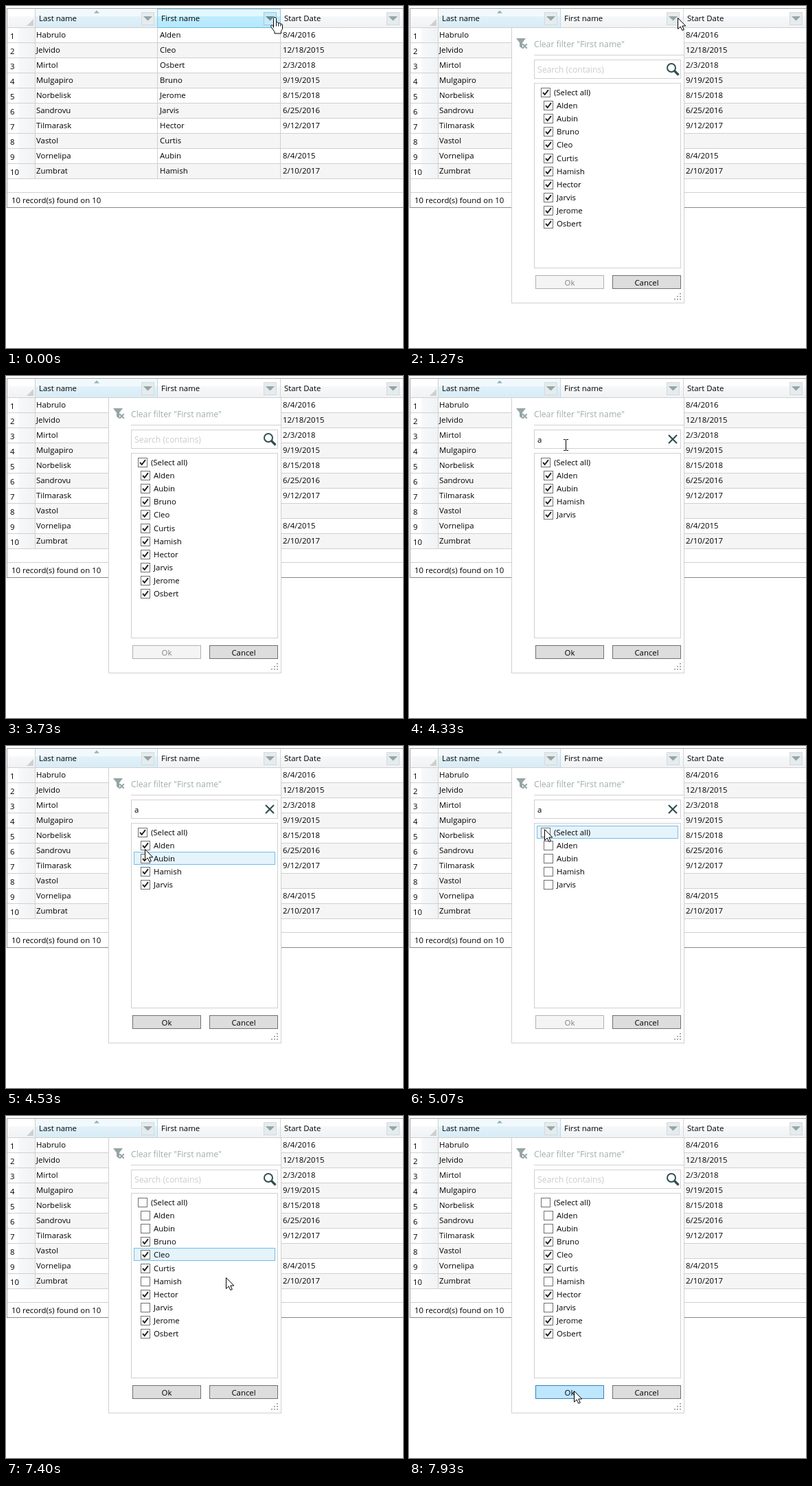
An HTML page with a canvas for the animation above (8000 ms loop, 578 by 498 pixels).

```html
<!DOCTYPE html>
<html lang="en">
<head>
<meta charset="utf-8">
<title>Column filter</title>
<style>
html, body { margin: 0; width: 100%; height: 100%; overflow: hidden; background: #fff; }
canvas { display: block; width: 578px; height: 498px; }
</style>
</head>
<body>
<canvas id="stage" width="578" height="498"></canvas>
<script>
const ctx = document.getElementById('stage').getContext('2d');
const LOOP = 8000, FPS = 15;
const SLATE = '#2f4f4f', MUTED = '#95a5a6', LINE = '#d0d0d0';

const people = [
  ['Habrulo', 'Alden', '8/4/2016'],
  ['Jelvido', 'Cleo', '12/18/2015'],
  ['Mirtol', 'Osbert', '2/3/2018'],
  ['Mulgapiro', 'Bruno', '9/19/2015'],
  ['Norbelisk', 'Jerome', '8/15/2018'],
  ['Sandrovu', 'Jarvis', '6/25/2016'],
  ['Tilmarask', 'Hector', '9/12/2017'],
  ['Vastol', 'Curtis', ''],
  ['Vornelipa', 'Aubin', '8/4/2015'],
  ['Zumbrat', 'Hamish', '2/10/2017']
];
const firstNames = people.map(p => p[1]).sort();
const hasA = name => /a/i.test(name);

// Ticks at which the interface changes
const OPEN = 8, TYPE = 57, FILTER = 58, UNCHECK = 76, HOT = 102, CLEAR = 106;

// Pointer path: tick, x, y
const path = [
  [19, 391, 17], [21, 368, 46], [23, 320, 92], [25, 268, 118], [28, 230, 94],
  [65, 228, 100], [66, 217, 138], [67, 206, 164], [68, 202, 150],
  [70, 199, 132], [74, 197, 121], [91, 197, 121], [93, 226, 117],
  [96, 325, 100], [99, 386, 90], [106, 386, 90], [109, 352, 160],
  [113, 287, 310], [116, 252, 391], [118, 244, 407], [119, 240, 400]
];

function pointer(k) {
  if (k <= path[0][0]) return path[0].slice(1);
  const i = path.findIndex(p => p[0] >= k);
  const a = path[i - 1], b = path[i];
  const u = (k - a[0]) / (b[0] - a[0]);
  return [a[1] + (b[1] - a[1]) * u, a[2] + (b[2] - a[2]) * u].map(Math.round);
}

const inside = ([px, py], x, y, w, h) => px >= x && px < x + w && py >= y && py < y + h;

function fill(x, y, w, h, color) {
  ctx.fillStyle = color;
  ctx.fillRect(x, y, w, h);
}

function box(x, y, w, h, bg, border) {
  fill(x, y, w, h, border);
  fill(x + 1, y + 1, w - 2, h - 2, bg);
}

function text(s, x, y, color = '#000', size = 11.4, align = 'left') {
  ctx.font = size + 'px "Open Sans", "Noto Sans", sans-serif';
  ctx.textAlign = align;
  ctx.fillStyle = color;
  ctx.fillText(s, x, y);
}

function shape(points, color) {
  ctx.beginPath();
  points.forEach(([x, y]) => ctx.lineTo(x, y));
  ctx.closePath();
  ctx.fillStyle = color;
  ctx.fill();
}

function stroke(points, color, width) {
  ctx.beginPath();
  points.forEach(([x, y], i) => i ? ctx.lineTo(x, y) : ctx.moveTo(x, y));
  ctx.strokeStyle = color;
  ctx.lineWidth = width;
  ctx.stroke();
}

function cross(x, y, r, color, width) {
  stroke([[x - r, y - r], [x + r, y + r]], color, width);
  stroke([[x - r, y + r], [x + r, y - r]], color, width);
}

// Two-tone glass gradient with a hard edge at 40 %
function glass(x, y, w, h, [top, low, end], vertical = true) {
  const g = vertical ? ctx.createLinearGradient(0, y, 0, y + h)
                     : ctx.createLinearGradient(x, 0, x + w, 0);
  g.addColorStop(0, top);
  g.addColorStop(0.4, top);
  g.addColorStop(0.4, low);
  g.addColorStop(1, end);
  fill(x, y, w, h, g);
}

const PLAIN = ['#ffffff', '#f7f8fa', '#f1f2f4'];
const SORTED = ['#f2f9fc', '#e1f1f9', '#d8ecf6'];
const HOVER = ['#e3f7ff', '#bdedff', '#b7e7fb'];

function header(label, x, w, tones, edge) {
  glass(x, 4, w, 27, tones);
  fill(x + w - 1, 4, 1, 27, edge);
  text(label, x + 5, 22);
}

function dropButton(x, hot) {
  box(x, 9, 19, 19, hot ? '#c5ebfa' : 'rgba(255,255,255,0)', hot ? '#a3c6d4' : '#d3dadd');
  if (!hot) {
    ctx.globalAlpha *= 0.6;
    fill(x + 1, 10, 17, 17, '#f4f7f8');
    ctx.globalAlpha /= 0.6;
  }
  shape([[x + 3, 15], [x + 16, 15], [x + 9.5, 21.5]], hot ? '#688792' : MUTED);
}

function table(hover) {
  fill(1, 3, 577, 1, '#a0a0a0');
  fill(1, 3, 1, 291, '#a0a0a0');
  fill(1, 293, 577, 1, '#888');

  glass(2, 4, 41, 27, PLAIN);
  fill(42, 4, 1, 27, LINE);
  shape([[40, 19], [40, 29], [30, 29]], '#cdcfd1');
  header('Last name', 43, 178, SORTED, '#b8dced');
  shape([[128, 10.5], [132, 6.5], [136, 10.5]], '#8eb1c0');
  header('First name', 221, 179, hover ? HOVER : PLAIN, hover ? '#8ec4dd' : '#d5d5d5');
  header('Start Date', 400, 178, PLAIN, '#f1f2f4');
  fill(2, 31, 576, 1, LINE);
  if (hover) {
    fill(220, 4, 1, 27, '#8ec4dd');
    fill(221, 4, 178, 1, '#86c6e4');
    fill(221, 31, 178, 1, '#69bbe3');
  }
  dropButton(197, false);
  dropButton(375, hover);
  dropButton(554, false);

  people.forEach((row, i) => {
    const y = 32 + 22 * i;
    fill(43, y, 535, 21, i % 2 ? '#f5f5f5' : '#fff');
    glass(2, y, 41, 21, PLAIN, false);
    fill(2, y + 21, 576, 1, LINE);
    text(String(i + 1), 6, y + 16);
    row.forEach((s, c) => text(s, [44, 224, 403][c], y + 14));
  });
  [42, 220, 399].forEach(x => fill(x, 32, 1, 220, LINE));
  fill(2, 271, 576, 1, LINE);
  text('10 record(s) found on 10', 8, 287);
}

function checkbox(x, y, on) {
  box(x, y, 14, 14, '#fff', '#707070');
  if (on) stroke([[x + 3, y + 6.8], [x + 5.7, y + 10], [x + 11, y + 3.2]], '#212121', 2);
}

function button(label, x, state) {
  const [bg, edge, ink] = {
    normal: ['#dddddd', '#707070', '#000'],
    hover: ['#bee6fd', '#3c7fb1', '#000'],
    off: ['#f4f4f4', '#adb2b5', '#838383']
  }[state];
  box(x, 392, 100, 20, bg, edge);
  text(label, x + 50, 407, ink, 11.4, 'center');
}

function funnel() {
  shape([[156, 47], [170, 47], [165, 53.5], [165, 62], [161, 59], [161, 53.5]], MUTED);
  fill(165, 55, 8, 8, '#fff');
  cross(168.5, 58.5, 3.2, MUTED, 2);
}

function searchIcon() {
  ctx.beginPath();
  ctx.arc(382, 90, 6, 0, Math.PI * 2);
  ctx.strokeStyle = SLATE;
  ctx.lineWidth = 2;
  ctx.stroke();
  stroke([[386.5, 94.5], [392.5, 100.5]], SLATE, 3.2);
}

function list(k) {
  const filtered = k >= FILTER && k < CLEAR;
  const cleared = k >= UNCHECK;
  const names = filtered ? firstNames.filter(hasA) : firstNames;
  const lastPos = pointer(k - 1);
  box(182, 112, 214, 270, '#fff', LINE);
  ['(Select all)', ...names].forEach((name, i) => {
    const y = Math.round(116 + 19.1 * i);
    const x = i ? 196 : 192;
    if (k > 19 && inside(lastPos, 186, y, 206, 19)) box(186, y, 206, 19, '#e5f3fb', '#70c0e7');
    checkbox(x, y + 3, !cleared || (i > 0 && !hasA(name)));
    text(name, x + 19, y + 14);
  });
}

function popup(k, pos) {
  box(149, 31, 252, 402, '#fff', LINE);
  funnel();
  text('Clear filter "First name"', 182, 60, '#a0adae', 12.2);
  fill(182, 71, 218, 1, LINE);

  const typed = k >= TYPE && k < CLEAR;
  box(182, 78, 214, 28, '#fff', LINE);
  if (typed) {
    text('a', 187, 97);
    cross(384, 92, 6, k >= HOT ? '#e0201b' : SLATE, 2.2);
  } else {
    text('Search (contains)', 187, 97, '#c9cccd', 12.2);
    searchIcon();
  }
  const caret = (k >= 28 && k < 34) || (k >= 43 && k < 50);
  if (caret) fill(187, 83, 1, 18, '#000');
  if (k >= TYPE && k < 65) fill(194, 83, 1, 18, '#000');

  list(k);

  const enabled = (k >= FILTER && k < UNCHECK) || k >= CLEAR;
  const over = inside(pos, 184, 392, 100, 20);
  button('Ok', 184, !enabled ? 'off' : over ? 'hover' : 'normal');
  button('Cancel', 296, 'normal');

  for (let r = 0; r < 3; r++)
    for (let c = 2 - r; c < 3; c++) fill(386 + c * 4, 418 + r * 4, 2, 2, '#a9b0b3');
}

function outlined(d, x, y) {
  const p = new Path2D(d);
  ctx.save();
  ctx.translate(x + 0.5, y + 0.5);
  ctx.lineJoin = 'round';
  ctx.fillStyle = '#fff';
  ctx.fill(p);
  ctx.strokeStyle = '#000';
  ctx.lineWidth = 1;
  ctx.stroke(p);
  ctx.restore();
}

const ARROW = 'M0 0V16L3.7 12.5L6.3 18L8.8 17L6.3 11.5H11.3Z';
const HAND = 'M-2 14V1Q-2 -1 0 -1Q2 -1 2 1V7Q2.5 6 4 6.2Q5.2 6.5 5.2 8Q6 7 7.4 7.4Q8.4 8 8.4 9' +
  'Q9 8.4 10.2 8.8Q11 9.3 11 10.5V16L9 19V22.5H-0.5V20L-5.5 13Q-6.5 11 -5 10.3Q-4 10 -2 12.5Z' +
  'M2 7V12M5.2 8V12M8.4 9V12';

function drawPointer(k, [x, y]) {
  if (k >= 56 && k < 65) return;
  if (k < 9) outlined(HAND, 391, 17);
  else if (k >= HOT && k < CLEAR) outlined(HAND, x, y);
  else if (inside([x, y], 183, 79, 190, 26)) {
    fill(x, y - 7, 1, 15, '#000');
    fill(x - 3, y - 8, 3, 1, '#000');
    fill(x + 1, y - 8, 3, 1, '#000');
    fill(x - 3, y + 8, 3, 1, '#000');
    fill(x + 1, y + 8, 3, 1, '#000');
  } else outlined(ARROW, x, y);
}

function draw(ms) {
  const k = Math.min(119, Math.floor((ms + 5) * FPS / 1000));
  const pos = pointer(k);
  fill(0, 0, 578, 498, '#fff');
  table(k < OPEN + 1);
  if (k >= OPEN) {
    ctx.globalAlpha = Math.min(1, (k - OPEN + 1) / 4);
    popup(k, pos);
    ctx.globalAlpha = 1;
  }
  drawPointer(k, pos);
}

const start = performance.now();
function tick() {
  draw((performance.now() - start) % LOOP);
  requestAnimationFrame(tick);
}
tick();
</script>
</body>
</html>
```
